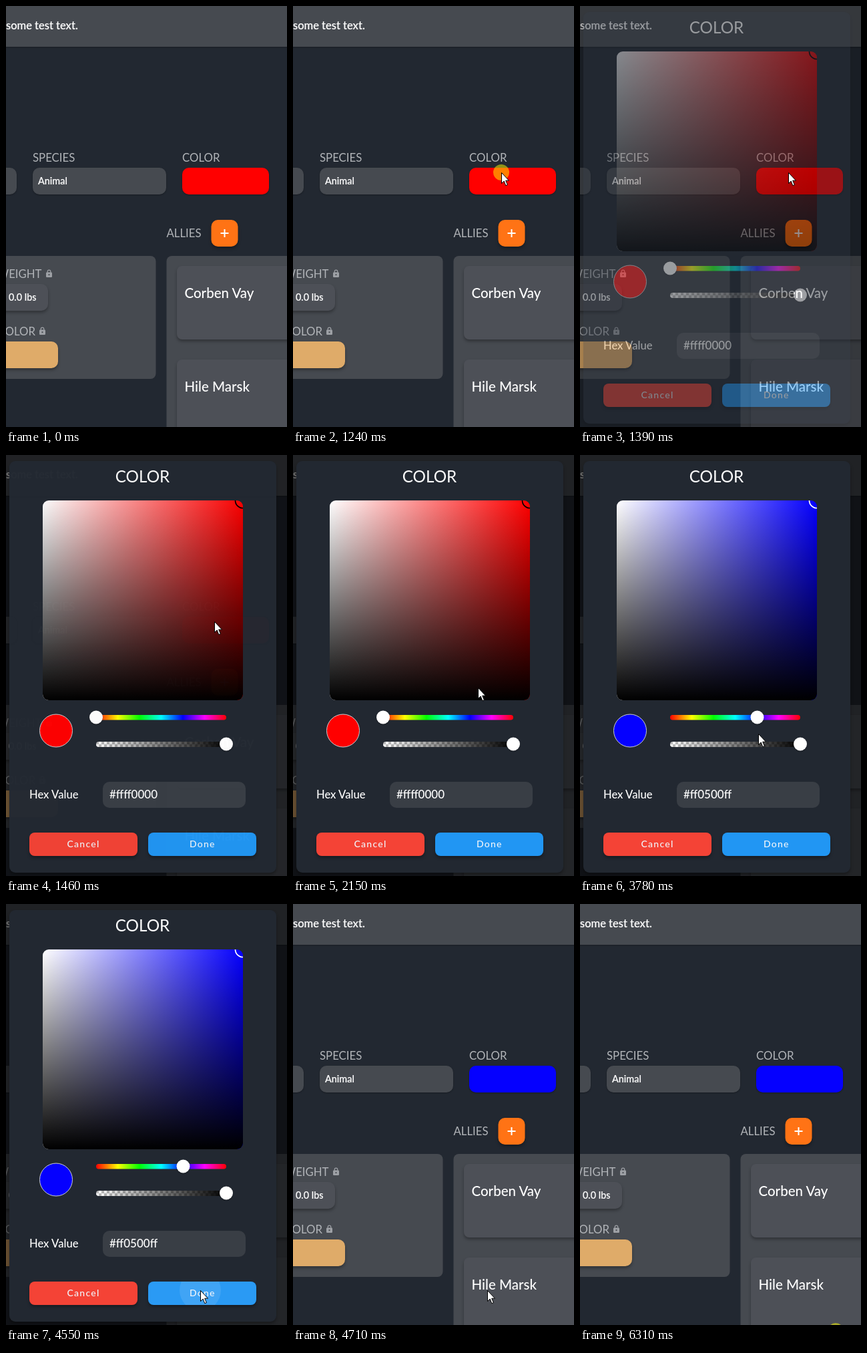
An HTML page that plays this animation: 421x630 px, repeating every 6400 ms.

```html
<!DOCTYPE html>
<html lang="en">
<head>
<meta charset="utf-8">
<title>Color picker</title>
<style>
  html, body { margin: 0; width: 100%; height: 100%; overflow: hidden; background: #222831; }
  svg { display: block; width: 421px; height: 630px; font-family: Lato, "Open Sans", sans-serif; }
  text { fill: #fff; font-weight: 500; white-space: pre; }
  .label { fill: #b1b4b8; font-size: 16.8px; font-weight: 400; }
  .value { font-size: 14.4px; stroke: #fff; stroke-width: .2; }
  .name { font-size: 20.5px; }
  .button { font-size: 14px; letter-spacing: 1.25px; fill: #f1f5fa; }
  .field, .panel { fill: #464a50; }
  .card { fill: #4d5057; }
  .raised { filter: drop-shadow(0 3px 2px rgba(0, 0, 0, .3)); }
  .soft { filter: drop-shadow(0 1px 1px rgba(0, 0, 0, .3)); }
</style>
</head>
<body>
<svg viewBox="0 0 421 630">
  <defs>
    <linearGradient id="sat">
      <stop stop-color="#fff"/>
      <stop id="satEnd" offset="1" stop-color="#f00"/>
    </linearGradient>
    <linearGradient id="dark" x2="0" y2="1">
      <stop stop-color="#000" stop-opacity="0"/>
      <stop offset="1" stop-color="#000"/>
    </linearGradient>
    <linearGradient id="fade">
      <stop stop-color="#000" stop-opacity="0"/>
      <stop offset="1" stop-color="#000"/>
    </linearGradient>
    <linearGradient id="rainbow"></linearGradient>
    <pattern id="checker" x="135" y="429" width="8" height="8" patternUnits="userSpaceOnUse">
      <path fill="#fff" d="M0 0h8v8H0z"/>
      <path fill="#bdbdbd" d="M0 0h4v4H0zM4 4h4v4H4z"/>
    </pattern>
    <clipPath id="areaClip"><rect x="55" y="68" width="300" height="299" rx="9"/></clipPath>
    <clipPath id="doneClip"><rect x="213" y="565" width="162" height="35" rx="8"/></clipPath>
    <g id="lock">
      <path d="M2.2 4.5V3a2.3 2.3 0 0 1 4.6 0v1.5" fill="none" stroke="#9da0a5" stroke-width="1.2"/>
      <rect y="4" width="9" height="7.5" rx="1.2" fill="#9da0a5"/>
      <circle cx="4.5" cy="7.7" r="1.1" fill="#464a50"/>
    </g>
  </defs>

  <path fill="#222831" d="M0 0h421v630H0z"/>
  <rect class="field soft" x="-20" y="-20" width="461" height="81"/>
  <text class="value" x="0" y="35" style="font-size:16.5px">some test text.</text>

  <rect class="field soft" x="-60" y="242" width="76" height="40" rx="10"/>
  <text class="label" x="40" y="232.500">SPECIES</text>
  <rect class="field soft" x="40" y="242" width="200" height="40" rx="10"/>
  <text class="value" x="48" y="267">Animal</text>
  <text class="label" x="264" y="232.500">COLOR</text>
  <rect id="chip" class="soft" x="264" y="242" width="130" height="40" rx="10"/>

  <text class="label" x="240.500" y="345.500">ALLIES</text>
  <rect class="raised" x="307.500" y="320" width="40" height="40" rx="10" fill="#ff7315"/>
  <path d="M321.500 340h12M327.500 334v12" stroke="#fff" stroke-width="2"/>

  <rect class="panel" x="-40" y="374" width="264.500" height="184" rx="8"/>
  <text class="label" x="53.500" y="406.500" text-anchor="end">WEIGHT</text>
  <use href="#lock" x="60" y="394.500"/>
  <rect class="card raised" x="-40" y="416" width="103" height="40" rx="10"/>
  <text class="value" x="4" y="441">0.0 lbs</text>
  <text class="label" x="44" y="492.500" text-anchor="end">COLOR</text>
  <use href="#lock" x="50" y="480.500"/>
  <rect class="raised" x="-40" y="502" width="118" height="40" rx="10" fill="#dfab69"/>

  <rect class="panel" x="240.500" y="374" width="220" height="300" rx="8"/>
  <rect class="card raised" x="256" y="389" width="200" height="110" rx="8"/>
  <text class="name" x="267.500" y="437">Corben Vay</text>
  <rect class="card raised" x="256" y="529" width="200" height="110" rx="8"/>
  <text class="name" x="267.500" y="577">Hile Marsk</text>

  <g id="dialog">
    <path fill="#000" fill-opacity=".54" d="M0 0h421v630H0z"/>
    <rect class="raised" x="5" y="9" width="400" height="616" rx="9" fill="#222831"/>
    <text x="204.500" y="41" font-size="24.300" text-anchor="middle" style="font-weight:400">COLOR</text>

    <g clip-path="url(#areaClip)">
      <path fill="url(#sat)" d="M55 68h300v299H55z"/>
      <path fill="url(#dark)" d="M55 68h300v299H55z"/>
      <circle id="ring" cx="355" cy="68" r="11.500" fill="none" stroke-width="1.700"/>
    </g>

    <circle id="swatch" cx="75" cy="412.500" r="24.500" stroke="#c9cccf"/>
    <rect x="135" y="389" width="195" height="7.500" rx="3.700" fill="url(#rainbow)"/>
    <circle id="thumb" class="soft" cy="392.500" r="10" fill="#fff"/>
    <rect x="135" y="429" width="195" height="8" rx="4" fill="url(#checker)"/>
    <rect x="135" y="429" width="195" height="8" rx="4" fill="url(#fade)"/>
    <circle class="soft" cx="330" cy="432.500" r="10" fill="#fff"/>

    <text x="35" y="514" font-size="16.600">Hex Value</text>
    <rect x="145" y="489" width="214" height="39" rx="10" fill="#393e45"/>
    <text id="hex" x="155" y="514" font-size="17"></text>

    <rect class="raised" x="35" y="565" width="162" height="35" rx="8" fill="#f44336"/>
    <text class="button" x="91.500" y="587">Cancel</text>
    <rect class="raised" x="213" y="565" width="162" height="35" rx="8" fill="#2196f3"/>
    <g clip-path="url(#doneClip)" fill="#fff">
      <path id="hover" fill-opacity=".04" d="M213 565h162v35H213z"/>
      <circle id="ripple" cx="291" cy="578" fill-opacity=".1"/>
    </g>
    <text class="button" x="275" y="587">Done</text>
  </g>

  <circle id="press" r="12" fill="#ff0" fill-opacity=".5"/>
  <path id="cursor" fill="#fff" stroke="#000"
        d="M.5 .5V16.500L4.200 13L6.800 19.700L9.400 18.600L6.700 12.200H11.500Z"/>
</svg>

<script>
const LOOP = 6400;
const $ = id => document.getElementById(id);
const set = (id, attrs) => {
  for (const key in attrs) $(id).setAttribute(key, attrs[key]);
};

$("rainbow").innerHTML = [0, 60, 120, 180, 240, 300, 360]
  .map(h => `<stop offset="${h / 360}" stop-color="hsl(${h} 100% 50%)"/>`).join("");

// Pointer moves along quadratic curves, each in a number of hard steps
const moves = [
  { start: 70,   end: 680,  steps: 9, from: [400, 570], bend: [248, 262], to: [312, 251] },
  { start: 760,  end: 760,  steps: 1, from: [312, 251], bend: [312, 250], to: [312, 249] },
  { start: 1850, end: 2310, steps: 7, from: [312, 249], bend: [276, 350], to: [258, 402] },
  { start: 2540, end: 2700, steps: 3, from: [258, 402], bend: [262, 398], to: [265, 395] },
  { start: 3000, end: 3080, steps: 2, from: [265, 395], bend: [266, 394], to: [266, 393] },
  { start: 3780, end: 4400, steps: 9, from: [266, 393], bend: [272, 505], to: [291, 578] },
  { start: 5620, end: 5930, steps: 5, from: [291, 578], bend: [318, 590], to: [354, 633] }
];

// Values that hold until the next entry: [time, value]
const dialogAlpha = [[0, 0], [1390, .45], [1460, .98], [1540, 1], [4630, .45], [4710, 0]];
const rippleSize = [[0, 0], [4470, 14], [4550, 31], [4630, 46], [4710, 0]];

const latest = (list, t) => list.filter(([at]) => at <= t).pop()[1];

function pointerAt(t) {
  const m = moves.filter(move => move.start <= t).pop();
  if (!m) return null;
  const gap = (m.end - m.start) / Math.max(1, m.steps - 1);
  const step = gap ? Math.floor((t - m.start) / gap + .02) : 0;
  const u = Math.min(1, (step + 1) / m.steps);
  return m.from.map((a, i) =>
    Math.round((1 - u) ** 2 * a + 2 * u * (1 - u) * m.bend[i] + u * u * m.to[i]));
}

function render(t) {
  const blue = t >= 3310;
  const color = blue ? "#0500ff" : "#ff0000";
  set("satEnd", { "stop-color": color });
  set("swatch", { fill: color });
  set("ring", { stroke: blue ? "#fff" : "#000" });
  set("thumb", { cx: blue ? 265.5 : 135 });
  set("chip", { fill: t >= 4630 ? "#0500ff" : "#ff0000" });
  $("hex").textContent = color.replace("#", "#ff");

  const alpha = latest(dialogAlpha, t);
  set("dialog", { opacity: alpha, visibility: alpha ? "visible" : "hidden" });
  set("ripple", { r: latest(rippleSize, t) });

  const at = pointerAt(t);
  set("hover", { opacity: at && at[1] >= 565 ? 1 : 0 });
  set("cursor", {
    visibility: at ? "visible" : "hidden",
    transform: `translate(${at || [0, 0]})`
  });

  const opening = t >= 1160 && t < 1390;
  const leaving = t >= 6310;
  set("press", {
    visibility: opening || leaving ? "visible" : "hidden",
    cx: leaving ? 383 : 312,
    cy: leaving ? 639 : 249
  });
}

const began = performance.now();
function tick() {
  render((performance.now() - began) % LOOP);
  requestAnimationFrame(tick);
}
tick();
</script>
</body>
</html>
```
